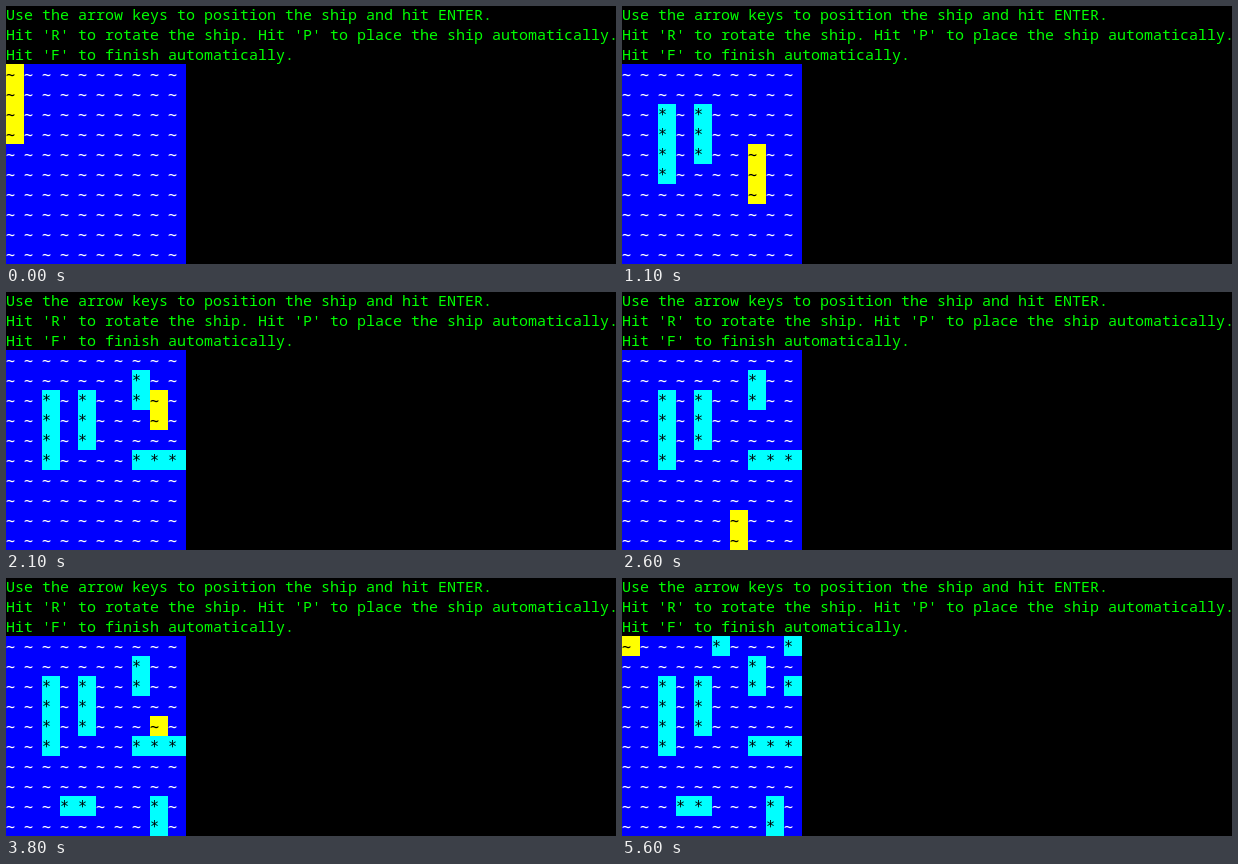
An HTML page for the animation above (5700 ms loop, 610 px wide and 258 px high).

```html
<!DOCTYPE html>
<html lang="en">
<head>
<meta charset="utf-8">
<title>Place your ships</title>
<style>
  html, body { margin: 0; width: 100%; height: 100%; overflow: hidden; background: #000; }
  body { position: relative; }
  pre { position: absolute; left: 0; top: -2px; margin: 0; color: #0f0; font: 500 15px/20px "Noto Sans Mono", monospace; }
  #board {
    position: absolute; left: 0; top: 58px;
    display: grid; grid: repeat(10, 20px) / repeat(10, 18px);
    font: 15px/22px "DejaVu Sans Mono", monospace;
  }
  .sea { background: #00f; color: #fff; }
  .ship { background: #0ff; color: #000; }
  .active { background: #ff0; color: #000; }
</style>
</head>
<body>
<pre>Use the arrow keys to position the ship and hit ENTER.
Hit 'R' to rotate the ship. Hit 'P' to place the ship automatically.
Hit 'F' to finish automatically.</pre>
<div id="board"></div>
<script>
const SIZE = 10, STEP = 100;
const FLEET = [4, 3, 3, 2, 2, 2, 1, 1, 1, 1];

// Keys pressed in each step: l, r, u, d move, t rotates, e places the ship.
const KEYS = ('r r d d er r er r r d d rd u t eu u u u l er d dd ld l d dd l l t e ' +
  'r r r r eu uu uu d u u r eu l u r e l l l l e l l l l l').split(' ');
const MOVES = { l: [-1, 0], r: [1, 0], u: [0, -1], d: [0, 1] };

const board = document.getElementById('board');
const cells = Array.from({ length: SIZE * SIZE }, () => board.appendChild(document.createElement('div')));

// Cell indices of a ship turning around its pivot (x, y).
function shipCells(length, x, y, flat) {
  const back = flat ? length >> 1 : (length - 1) >> 1;
  return Array.from({ length }, (_, i) =>
    flat ? y * SIZE + x - back + i : (y - back + i) * SIZE + x);
}

function play(steps) {
  const placed = new Set();
  let ship = 0, x = 0, y = 1, flat = false;
  const current = () => shipCells(FLEET[ship], x, y, flat);
  for (const key of KEYS.slice(0, steps).join('')) {
    if (key === 't') {
      flat = !flat;
    } else if (key === 'e') {
      current().forEach(i => placed.add(i));
      ship++;
      flat = false;
    } else {
      x += MOVES[key][0];
      y += MOVES[key][1];
    }
  }
  return { placed, active: new Set(current()) };
}

let shown = -1;
function draw() {
  const step = Math.floor(performance.now() / STEP) % (KEYS.length + 1);
  if (step !== shown) {
    shown = step;
    const { placed, active } = play(step);
    cells.forEach((cell, i) => {
      cell.textContent = placed.has(i) ? '*' : '~';
      cell.className = active.has(i) ? 'active' : placed.has(i) ? 'ship' : 'sea';
    });
  }
  requestAnimationFrame(draw);
}
draw();
</script>
</body>
</html>
```
